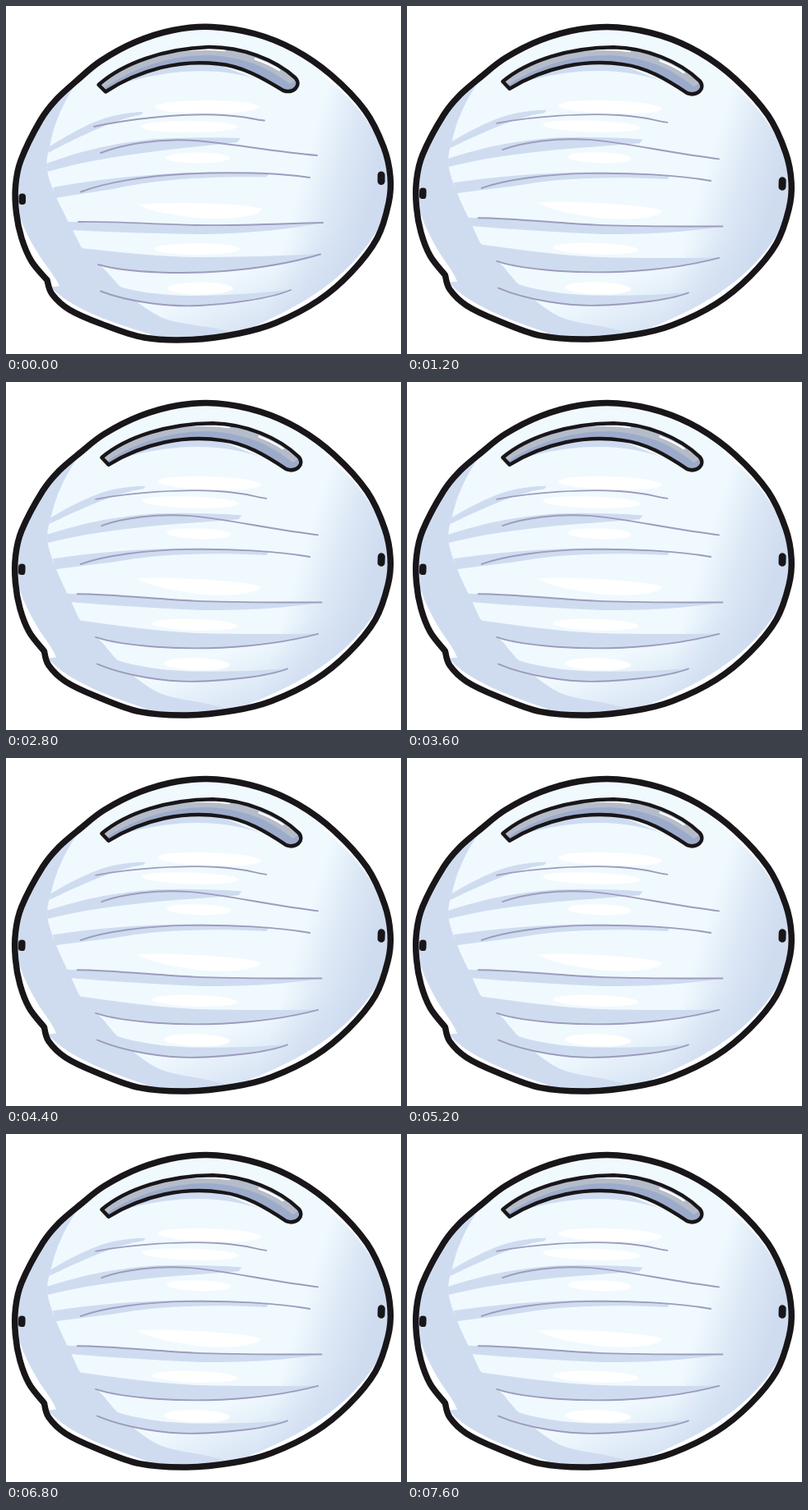
These frames come from a looping animation (480x424 px, 8 s). An HTML page:

```html
<!DOCTYPE html>
<html lang="en">
<head>
<meta charset="utf-8">
<title>Dust mask</title>
<style>
html, body { margin: 0; width: 100%; height: 100%; overflow: hidden; background: #fff; }
svg { display: block; width: 100vw; height: 100vh; }
</style>
</head>
<body>
<svg viewBox="0 0 480 424">
  <defs>
    <path id="shell"/>
    <path id="grip" d="M112.500 96C142 69.500 192 52 246 50C286 49.500 327 65 351.500 87.500C360 97 349 107 337 103C311 87 286 73 258 70.500C212 65 163 77 121 104.500Z"/>
    <clipPath id="inside"><use href="#shell"/></clipPath>
    <clipPath id="inGrip"><use href="#grip"/></clipPath>
    <linearGradient id="side" gradientUnits="userSpaceOnUse" x1="354" y1="226" x2="440" y2="250">
      <stop offset="0" stop-color="#cfdcf0" stop-opacity="0"/>
      <stop offset=".5" stop-color="#cfdcf0" stop-opacity=".6"/>
      <stop offset="1" stop-color="#cfdcf0"/>
    </linearGradient>
    <linearGradient id="low" gradientUnits="userSpaceOnUse" x1="296" y1="318" x2="330" y2="392">
      <stop offset="0" stop-color="#cfdcf0" stop-opacity="0"/>
      <stop offset="1" stop-color="#cfdcf0" stop-opacity=".85"/>
    </linearGradient>
  </defs>
  <g id="mask">
    <g clip-path="url(#inside)">
      <path fill="#f0f9fe" d="M0 0H480V424H0Z"/>
      <path fill="url(#side)" d="M0 0H480V424H0Z"/>
      <path fill="url(#low)" d="M0 0H480V424H0Z"/>
      <g fill="#cfdcf0">
        <path d="M86 93C69 118 57 146 53 172Q48 186 50 201C53 218 66 244 77 265L91 293C104 306 114 316 122 323C139 344 160 365 190 380C212 389 247 389 272 397L260 424H0V90Z"/>
        <path d="M53 171C80 154 105 140 130 134Q152 129 167 129L164 132.500C140 137 110 148 51 179Z"/>
        <path d="M49 192C90 177 125 168 180 162Q240 159 285 161L281 166C225 173 135 178 50 202Z"/>
        <path d="M57 221C110 211 160 206 220 203Q290 202 319 205L316 208.500C240 207 180 212 130 223Q90 229 60 234Z"/>
        <path d="M75 263C130 263 180 266 230 267Q310 266 380 265C350 271 300 277 240 278Q150 277 80 273Z"/>
        <path d="M90 295C130 299 180 305 230 306Q310 306 381 302C340 315 290 323 240 325Q160 327 112 316Z"/>
        <path d="M124 337C150 348 190 353 230 353Q290 352 343 346C310 358 270 365 235 366Q180 366 140 356Z"/>
        <path d="M150 88C190 70 240 68 262 73L312 92C272 76 212 74 150 92Z"/>
      </g>
      <g fill="#fff">
        <ellipse cx="244" cy="123" rx="63" ry="8"/>
        <ellipse cx="222" cy="147" rx="59" ry="7"/>
        <ellipse cx="233" cy="185" rx="39" ry="6.500"/>
        <path d="M160 242C195 238 290 240 311 247C307 258 258 261 230 258C200 254 174 250 160 242Z"/>
        <ellipse cx="232" cy="296" rx="52" ry="7"/>
        <ellipse cx="236" cy="344" rx="40" ry="7.500"/>
        <path d="M14 248C21 273 36 299 51 319Q60 331 65 341L52 343L0 310V245Z"/>
        <path d="M380 81C413 106 437 131 456 169L480 150L420 60Z"/>
        <path d="M450 275C422 321 378 357 302 390L310 410L470 320Z"/>
        <path d="M58 346C82 368 118 383 176 400L150 424L40 370Z"/>
      </g>
      <g fill="none" stroke="#9d9cbd" stroke-width="1.900" stroke-linecap="round">
        <path d="M107 147C150 137 215 131 255 132.500S297 138 314 139.500"/>
        <path d="M115 179C140 169 180 162 220 163.500S320 177 378 182"/>
        <path d="M91 226.500C120 215 170 207 220 204.500S330 203 369 209"/>
        <path d="M88 263C130 262 180 266 230 267S340 265 385 264"/>
        <path d="M112 315C150 326 220 326.500 265 323S350 312 382 302.500"/>
        <path d="M115 347.500C150 361 200 367 235 365S320 357 346 346"/>
      </g>
    </g>
    <use href="#shell" fill="none" stroke="#191619" stroke-width="7.500" stroke-linejoin="round"/>
    <g clip-path="url(#inGrip)">
      <path fill="#9dabcb" d="M100 40H370V115H100Z"/>
      <path fill="#b5bcc9" d="M110 96C148 66 198 52 247 50Q312 52 352 90L345 95C312 70 285 63 250 60C202 59 156 74 118 101Z"/>
      <path fill="none" stroke="#fff" stroke-width="2.500" stroke-linecap="round" d="M203 55.500Q235 51 266 54M303 64.500Q319 70 332 78"/>
    </g>
    <use href="#grip" fill="none" stroke="#191619" stroke-width="4.500" stroke-linejoin="round"/>
    <g fill="#191619">
      <rect x="15.500" y="228.500" width="8.500" height="13.500" rx="4"/>
      <rect x="451.500" y="201.500" width="9" height="16.500" rx="4.500"/>
    </g>
  </g>
</svg>
<script>
const HOLD = 400, TILT = 1.8;
const mask = document.getElementById("mask");

// Hand-drawn rim, clockwise from the notch at lower left.
const rim = [
  [50, 334], [31, 311], [19, 283], [12.5, 252], [11.5, 220], [18, 188],
  [42, 139], [61, 114], [86, 91], [115, 67], [157, 44], [203, 29.5],
  [250, 25.5], [303, 34], [350, 53], [395, 84], [436, 127], [459, 172],
  [467, 208], [465, 240], [451, 283], [420, 324], [380, 358.5], [328, 386],
  [283, 399], [226, 406.5], [168, 404], [115, 387], [77, 370], [56, 351], [50, 334]
];

// Smooth open curve through all points.
function curve(pts) {
  const at = i => pts[Math.max(0, Math.min(pts.length - 1, i))];
  let d = "M" + pts[0];
  for (let i = 0; i < pts.length - 1; i++) {
    const [a, b, c, e] = [at(i - 1), at(i), at(i + 1), at(i + 2)];
    const out = b.map((v, k) => v + (c[k] - a[k]) / 6);
    const into = c.map((v, k) => v - (e[k] - b[k]) / 6);
    d += `C${out} ${into} ${c}`;
  }
  return d + "Z";
}

function draw(ms) {
  const tilted = Math.floor(ms / HOLD) % 2;
  mask.setAttribute("transform", `rotate(${tilted * TILT} 240 216)`);
}

let start = null;
function tick(now) {
  start ??= now;
  draw((now - start) % 8000);
  requestAnimationFrame(tick);
}

document.getElementById("shell").setAttribute("d", curve(rim));
draw(0);
requestAnimationFrame(tick);
</script>
</body>
</html>
```
